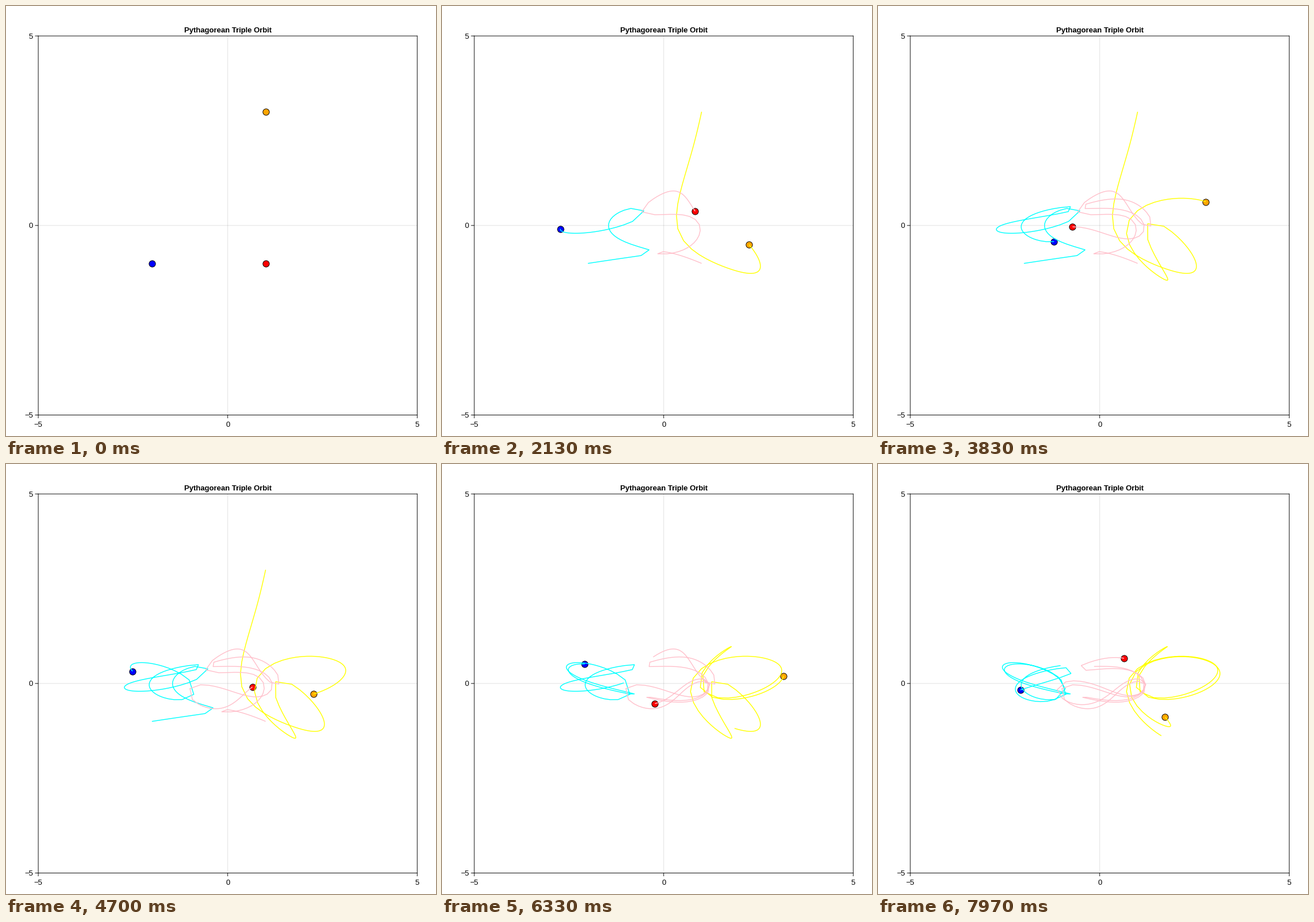
Recreate the animation shown at these times as a matplotlib script. Size 748 px wide and 748 px high, loop 8 s.

```python
import matplotlib.pyplot as plt
from matplotlib.animation import FuncAnimation
from matplotlib.lines import Line2D

SIZE, DPI = 748, 64
PX = 72 / DPI                       # one pixel in points
UNIT = 0.935 * PX                   # one design unit in points
LEFT, RIGHT, TOP, BOTTOM = 56.1, 715.3, 52.1, 711.5
TICK = 5.6
STEPS, DT, TAIL = 240, 0.1, 150
TICKS, INTERVAL = 400, 20           # clock ticks per loop, ms per tick

MASSES = (3, 4, 5)
START = (1 + 3j, -2 - 1j, 1 - 1j)
BODY_COLORS = ("orange", "blue", "red")
TRAIL_COLORS = ("yellow", "cyan", "pink")


def accel(p):
    """Newtonian gravity (G = 1) on three bodies in the complex plane."""
    m0, m1, m2 = MASSES
    a, b, c = p[1] - p[0], p[2] - p[0], p[2] - p[1]
    a /= abs(a) ** 3
    b /= abs(b) ** 3
    c /= abs(c) ** 3
    return (m1 * a + m2 * b, m2 * c - m0 * a, -m0 * b - m1 * c)


def move(p, v, h):
    return tuple(x + h * y for x, y in zip(p, v))


def rk4(p, v, h):
    a1 = accel(p)
    v2 = move(v, a1, h / 2)
    a2 = accel(move(p, v, h / 2))
    v3 = move(v, a2, h / 2)
    a3 = accel(move(p, v2, h / 2))
    v4 = move(v, a3, h)
    a4 = accel(move(p, v3, h))
    mix = lambda k: tuple((q + 2 * r + 2 * s + t) / 6 for q, r, s, t in zip(*k))
    return move(p, mix((v, v2, v3, v4)), h), move(v, mix((a1, a2, a3, a4)), h)


def simulate():
    """Body positions at every step, refined during close passes."""
    p, v = START, (0j, 0j, 0j)
    path = [p]
    for _ in range(STEPS - 1):
        left = DT
        while left > 1e-13:
            gap = min(abs(p[0] - p[1]), abs(p[0] - p[2]), abs(p[1] - p[2]))
            h = min(left, 0.006 * gap ** 1.5)
            p, v = rk4(p, v, h)
            left -= h
        path.append(p)
    return path


path = simulate()
xs = [[p[i].real for p in path] for i in range(3)]
ys = [[p[i].imag for p in path] for i in range(3)]

plt.rcParams["font.family"] = "Liberation Sans"
plt.rcParams["path.simplify"] = False

fig = plt.figure(figsize=(SIZE / DPI, SIZE / DPI), dpi=DPI, facecolor="white")
ax = fig.add_axes([LEFT / SIZE, 1 - BOTTOM / SIZE,
                   (RIGHT - LEFT) / SIZE, (BOTTOM - TOP) / SIZE])
ax.set(xlim=(-5, 5), ylim=(-5, 5), xticks=[], yticks=[])
ax.axhline(0, color="black", alpha=0.12, linewidth=UNIT, snap=False, zorder=1)
ax.axvline(0, color="black", alpha=0.12, linewidth=UNIT, snap=False, zorder=1)
for spine in ax.spines.values():
    spine.set(linewidth=UNIT, snap=False)


def label(x, baseline, text, ha, weight="normal"):
    fig.text(x / SIZE, 1 - baseline / SIZE, text, ha=ha, va="baseline",
             fontsize=14 * UNIT, weight=weight, color="black")


def tick(x0, y0, x1, y1):
    fig.add_artist(Line2D([x0 / SIZE, x1 / SIZE], [1 - y0 / SIZE, 1 - y1 / SIZE],
                          color="black", linewidth=UNIT, snap=False,
                          solid_capstyle="butt"))


mid_x, mid_y = (LEFT + RIGHT) / 2, (TOP + BOTTOM) / 2
label(mid_x, 46, "Pythagorean Triple Orbit", "center", "bold")
for text, x, y in (("\u22125", LEFT, BOTTOM), ("0", mid_x, mid_y), ("5", RIGHT, TOP)):
    label(x, 732, text, "center")
    label(47, y + 4.7, text, "right")
    tick(x, BOTTOM, x, BOTTOM + TICK)
    tick(LEFT - TICK, y, LEFT, y)

dots = [ax.plot([], [], "o", color=c, markersize=12 * UNIT, markeredgecolor="black",
                markeredgewidth=UNIT, zorder=3)[0] for c in BODY_COLORS]
trails = [ax.plot([], [], color=c, linewidth=1.5 * UNIT, solid_capstyle="butt",
                  solid_joinstyle="miter", zorder=4)[0] for c in TRAIL_COLORS]


def draw(n):
    # 30 steps a second, with step times rounded to 10 ms
    k = (6 * n + 4) // 10
    first = max(0, k - TAIL)
    for i in range(3):
        dots[i].set_data([xs[i][k]], [ys[i][k]])
        trails[i].set_data(xs[i][first:k + 1], ys[i][first:k + 1])
    return dots + trails


anim = FuncAnimation(fig, draw, frames=TICKS, interval=INTERVAL,
                     init_func=lambda: draw(0), repeat=True, repeat_delay=0)
plt.show()
```
